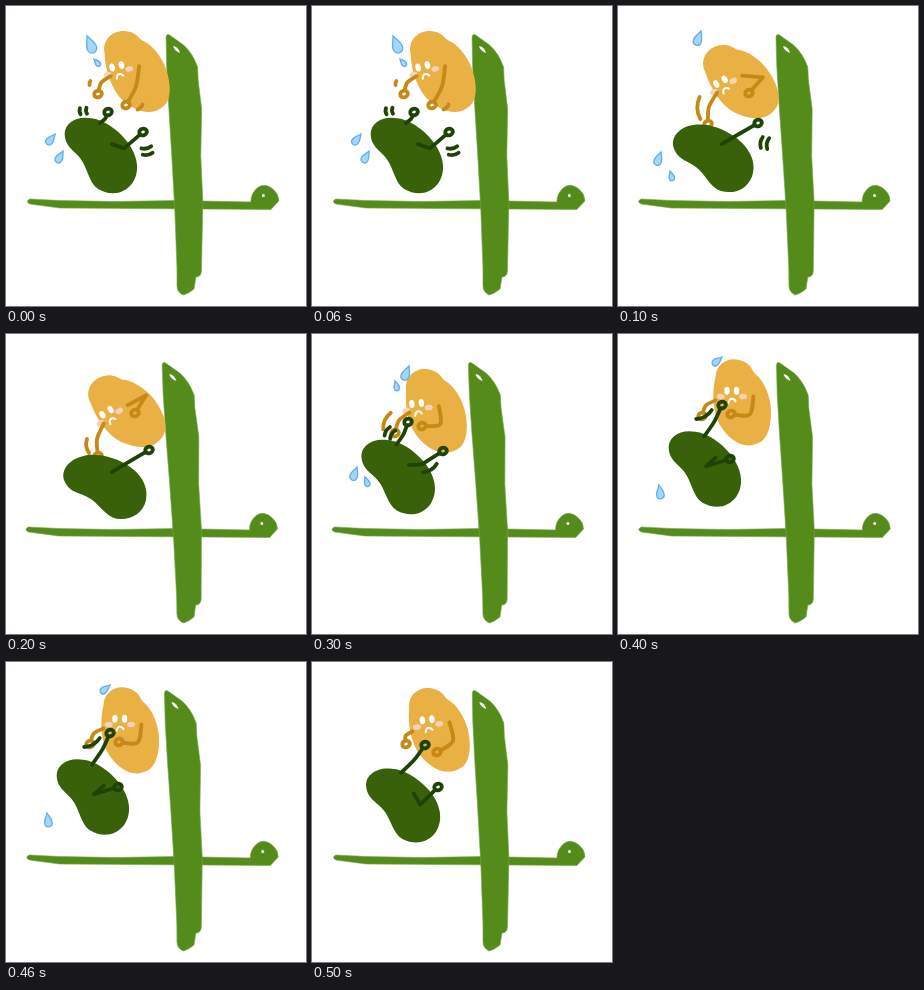
An HTML page for the animation above (0.6 s loop, 300 by 300 pixels).

```html
<!DOCTYPE html>
<html lang="en">
<head>
<meta charset="utf-8">
<title>Two beans by a stalk</title>
<style>
html, body { margin: 0; width: 100%; height: 100%; overflow: hidden; background: #fff; }
svg { display: block; width: 100vw; height: 100vh; }
.limbs { fill: none; stroke-width: 3.8; stroke-linecap: round; stroke-linejoin: round; }
</style>
</head>
<body>
<svg viewBox="0 0 300 300">
  <defs>
    <path id="gold" fill="#e9b044" d="M-20 -31 C-16 -46 1 -49 12 -39 C18 -34 17 -28 20 -25 C26 -18 29 -4 28 8 C26 27 18 42 7 43 C-8 46 -19 34 -25 19 C-30 6 -28 -14 -20 -31Z"/>
    <path id="green" fill="#396109" d="M-16 -37 C-10 -46 4 -46 15 -35 C24 -27 30 -12 31 4 C32 22 25 37 11 42 C-2 46 -14 40 -20 27 C-24 16 -16 2 -17 -8 C-17 -18 -23 -26 -16 -37Z"/>
    <g id="face">
      <g fill="#f8d2b8"><ellipse cx="-11" cy="6" rx="4" ry="2.800"/><ellipse cx="11.500" cy="5.500" rx="4" ry="2.800"/></g>
      <g fill="#fff"><ellipse cx="-4.800" rx="2.700" ry="4"/><ellipse cx="4.800" rx="2.700" ry="4"/></g>
      <path d="M-3 12 Q-2 8 0 8 Q3 8 4 10.500" fill="none" stroke="#fff" stroke-width="2" stroke-linecap="round"/>
    </g>
    <path id="drop" d="M0 0 C.15 .3 .27 .45 .27 .7 C.27 1.100 -.27 1.100 -.27 .7 C-.27 .45 -.1 .3 0 0Z"
      fill="#a5d5f8" stroke="#62aee8" stroke-width="1.300" vector-effect="non-scaling-stroke"/>
  </defs>
  <g id="plant" fill="#548b1b" stroke="#78a54c" stroke-width=".6" stroke-linejoin="round">
    <path d="M24 193 L54 194.500 L110 195.500 L170 194.500 L197 195 L245 196 Q245 187 252 181.500 Q259 176.500 267 183 Q273 188 273 195 L265 203.500 L197 203 L54 202 L24 198 Q19 195.500 24 193Z"/>
    <path d="M160.500 31 Q161 27.500 164 29 L178 39 Q187 47 192 61 L192.500 74 L196 103 L195 150 L197 196 L195.500 265 Q195 271 190 271 L188 283 Q182 288 177 289 Q171 286 171 280 L171 262 L169 205 L166 150 L163 100 L161 60Z"/>
    <path d="M167.500 40 Q173 41 174.500 47 Q168.500 45 167.500 40Z" fill="#fff" stroke="none"/>
    <circle cx="257.500" cy="189.500" r="1.500" fill="#fff" stroke="none"/>
  </g>
  <g id="beans"></g>
</svg>
<script>
const STEP = 100;

// Beans: x, y, tilt in degrees. Hands: left, right. Shakes: x, y, length, angle, count.
// Drops: tip x, tip y, size, angle.
const poses = [
  { gold: [130.5, 66, 27], goldHands: [[92, 88], [120, 99]], goldShakes: [[84, 77, 4, 100, 1], [134, 101, 7, -45, 1]],
    green: [93, 149.5, 35], greenHands: [[102, 106], [137, 126]], greenShakes: [[77.5, 105, 6, 85, 2], [141, 144.5, 10, -12, 2]],
    drops: [[81, 30, 18, -22], [88, 53, 9, -40], [49, 128, 13, 38], [57, 145, 13, 28]] },
  { gold: [123, 76, 42], goldHands: [[90, 118], [131, 87]], goldShakes: [[82, 102, 22, 88, 1]],
    green: [94.5, 152.5, 51], greenHands: [null, [140, 117]], greenShakes: [[147, 137, 11, 100, 2]],
    drops: [[83, 25, 15, 20], [43, 146, 14, 20], [52, 165, 10, -15]] },
  { gold: [121, 77.5, 45], goldHands: [[92, 122], [129, 79]], goldShakes: [[82, 112, 14, 82, 1]],
    green: [98.5, 153.5, 58], greenHands: [null, [143, 116]], greenShakes: [], drops: [] },
  { gold: [123.5, 77.5, 20], goldHands: [[83, 99], [110, 92]], goldShakes: [[75, 87, 18, 115, 1]],
    green: [84.5, 143, 37], greenHands: [[96, 88], [131, 117]], greenShakes: [[78, 99, 10, 122, 2], [118, 134, 16, -32, 1]],
    drops: [[97, 32, 15, 22], [83, 47, 10, -15], [45, 133, 14, 20], [53, 143, 10, -20]] },
  { gold: [123.5, 69, 12], goldHands: [[84, 82], [113, 80]], goldShakes: [], turn: 8,
    green: [85, 135, 35], greenHands: [[104, 71], [112, 125]], greenShakes: [[86, 80.5, 18, -30, 1]],
    drops: [[104, 23, 12, 50], [41, 151, 14, -8]] },
  { gold: [126.5, 68.5, 20], goldHands: [[94, 82], [125, 90]], goldShakes: [], turn: 8,
    green: [89.5, 143.5, 38], greenHands: [[113, 83], [126, 125]], greenShakes: [], drops: [] }
];

// Point fixed to a tilted bean, in stage coordinates
function onBean([x, y, tilt], px, py) {
  const a = tilt * Math.PI / 180, c = Math.cos(a), s = Math.sin(a);
  return [x + px * c + py * s, y - px * s + py * c];
}

// Elbow of a two-bone arm; side picks which way it bends
function elbow([x, y], [hx, hy], upper, fore, side) {
  const dist = Math.hypot(hx - x, hy - y), ex = (hx - x) / dist, ey = (hy - y) / dist;
  const along = (upper ** 2 - fore ** 2 + dist ** 2) / (2 * dist);
  const out = side * Math.sqrt(Math.max(0, upper ** 2 - along ** 2));
  return [x + ex * along + ey * out, y + ey * along - ex * out];
}

// Point beside the middle of a line
function bow([x, y], [hx, hy], out) {
  const dist = Math.hypot(hx - x, hy - y);
  return [(x + hx) / 2 + (hy - y) / dist * out, (y + hy) / 2 - (hx - x) / dist * out];
}

function arm(from, bend, hand, soft) {
  const [x, y] = hand, dx = bend[0] - x, dy = bend[1] - y, reach = 3.6 / Math.hypot(dx, dy);
  const wrist = [x + dx * reach, y + dy * reach];
  const line = soft ? `C${bend} ${bend} ${wrist}` : `L${bend} L${wrist}`;
  return `<path d="M${from}${line}"/><ellipse cx="${x}" cy="${y}" rx="3.900" ry="3.300" transform="rotate(-25 ${x} ${y})"/>`;
}

function shake([x, y, len, turn, count]) {
  let out = '';
  for (let k = 0; k < count; k++) {
    const off = (k - (count - 1) / 2) * 6.5;
    out += `<path transform="translate(${x} ${y}) rotate(${turn})" d="M${-len / 2} ${off} q${len / 2} ${len / 4} ${len} 0"/>`;
  }
  return out;
}

const limbs = (color, parts) => `<g class="limbs" stroke="${color}">${parts}</g>`;
const body = (id, [x, y, tilt], extra = '') =>
  `<g transform="translate(${x} ${y}) rotate(${-tilt})"><use href="#${id}"/>${extra}</g>`;
const drop = ([x, y, size, turn]) =>
  `<use href="#drop" transform="translate(${x} ${y}) rotate(${turn}) scale(${size})"/>`;

function goldBean({ gold, goldHands: [left, right], goldShakes, turn = 0 }) {
  const leaning = gold[2] > 40;
  const a = onBean(gold, -25, -8), b = onBean(gold, 5 + turn, -4);
  const face = `<use href="#face" transform="translate(${turn - 15} -14) rotate(13)"/>`;
  return body('gold', gold, face) + limbs('#c68915',
    arm(a, bow(a, left, -5), left, true) +
    arm(b, elbow(b, right, 21, 21, 1), right, !leaning) +
    goldShakes.map(shake).join(''));
}

function greenBean({ green, greenHands: [left, right], greenShakes }) {
  const a = onBean(green, 19.5, -26), b = onBean(green, 17, -2);
  return body('green', green) + limbs('#1f4306',
    (left ? arm(a, bow(a, left, -2), left, true) : '') +
    arm(b, elbow(b, right, 13, 25, -1), right, false) +
    greenShakes.map(shake).join(''));
}

const plant = document.getElementById('plant');
const beans = document.getElementById('beans');
let shown = -1;

function draw(i) {
  // The stalk sways left about its foot and back once per loop
  const lean = .009 * (1 + Math.cos((i - 2.4) / poses.length * 2 * Math.PI));
  plant.setAttribute('transform', `matrix(1 0 ${lean} 1 ${-285 * lean} 0)`);
  beans.innerHTML = goldBean(poses[i]) + greenBean(poses[i]) + poses[i].drops.map(drop).join('');
}

function tick() {
  const i = Math.floor(performance.now() / STEP) % poses.length;
  if (i !== shown) draw(shown = i);
  requestAnimationFrame(tick);
}
tick();
</script>
</body>
</html>
```
